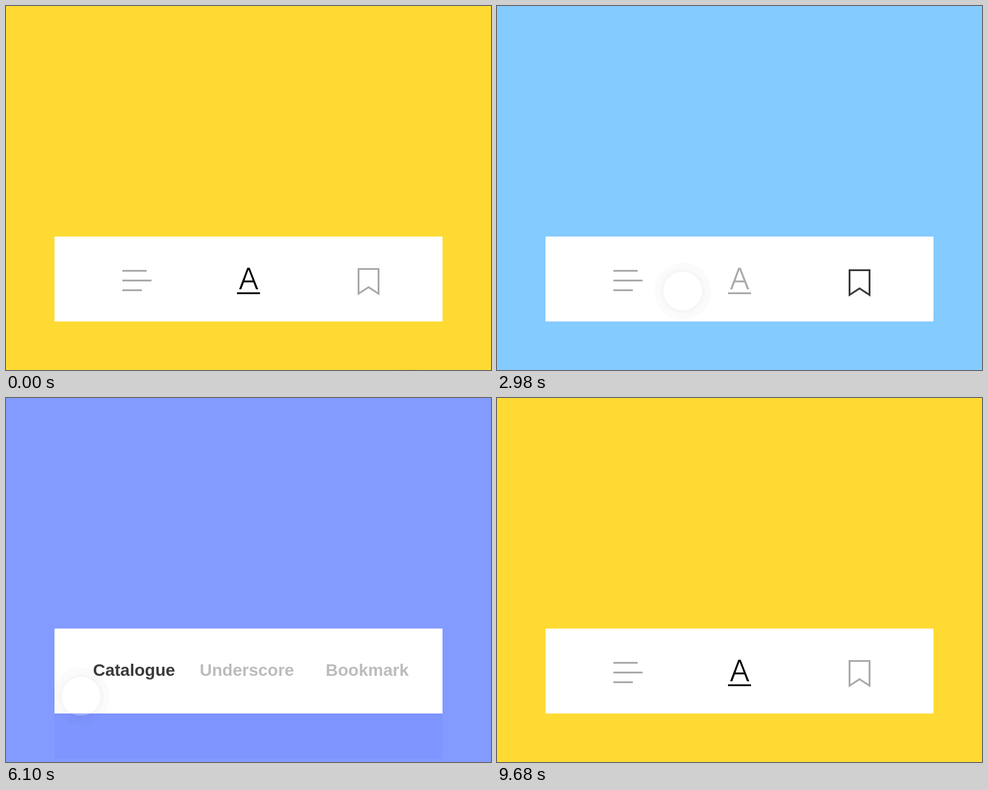
Recreate the animation shown at these times as an HTML page. Size 800 by 600 pixels, loop 9.72 s.

```html
<!DOCTYPE html>
<html lang="en">
<head>
<meta charset="utf-8">
<title>Tab bar</title>
<style>
  html, body { margin: 0; width: 100%; height: 100%; overflow: hidden; }
  #stage { position: relative; width: 800px; height: 600px; overflow: hidden; }
  svg { position: absolute; inset: 0; display: block; }
  text { font: bold 28px "Liberation Sans", Arial, sans-serif; }
  #cursor {
    position: absolute; left: -32px; top: -32px; width: 64px; height: 64px;
    border-radius: 50%; background: rgba(255, 255, 255, .2);
    box-shadow: 0 0 0 15px rgba(0, 0, 0, .015), 0 0 8px 1px rgba(0, 0, 0, .055);
  }
</style>
</head>
<body>
<div id="stage">
  <svg width="800" height="600" viewBox="0 0 800 600">
    <rect id="tint" x="80" y="520" width="640" height="75" fill="#7f95ff"/>
    <rect x="80" y="380" width="640" height="140" fill="#fff"/>
    <g id="catalogue">
      <path class="icon" d="M192 435h40v3h-40z M192 451h48v3h-48z M192 467h32v3h-32z"/>
      <text class="label" x="143.5" y="460">Catalogue</text>
    </g>
    <g id="underscore">
      <path class="icon" fill-rule="evenodd" d="M384.5 467L398 431.5h4L416 467h-3.6l-4.4-11.5h-15.6L388.1 467z
        M393.5 452.5h13.4L400 434.5z M381 472h38v3h-38z"/>
      <text class="label" x="319.5" y="460">Underscore</text>
    </g>
    <g id="bookmark">
      <path class="icon" fill-rule="evenodd" d="M580 432h36v45l-18-11.7-18 11.7z
        M583 435v36.5l15-9.8 15 9.8V435z"/>
      <text class="label" x="527.3" y="460">Bookmark</text>
    </g>
  </svg>
  <div id="cursor"></div>
</div>
<script>
const LOOP = 9720, SHIFT = 25, GREY = 169;
const YELLOW = [255, 218, 51], BLUE = [132, 203, 255], INDIGO = [131, 155, 255];

// start, end, colour, newly selected tab
const taps = [
  [1305, 1640, BLUE, 'bookmark'],
  [3390, 3820, INDIGO, 'catalogue'],
  [7830, 8170, YELLOW, 'underscore']
];

// icon-to-label swaps and back: in start, in end, out start, out end
const allTabs = [5700, 6160, 7150, 7620];
const swaps = {
  catalogue: [[3390, 3820, 4705, 5200], allTabs],
  underscore: [allTabs, [7830, 8170, 9385, 9680]],
  bookmark: [[1305, 1640, 2560, 3040], allTabs]
};

// start, end, from, bend, to
const moves = [
  [480, 1180, [660, 643], [655, 540], [614, 468]],
  [2570, 3230, [614, 468], [380, 484], [243, 462]],
  [5710, 6140, [243, 462], [150, 470], [123.5, 492]],
  [6140, 7460, [123.5, 492], [200, 500], [388, 459]],
  [8360, 9160, [388, 459], [390, 540], [391, 648]]
];

const $ = id => document.getElementById(id);
const clamp = v => Math.min(1, Math.max(0, v));
const span = (t, a, b) => clamp((t - a) / (b - a));
const mix = (a, b, p) => a + (b - a) * p;
const rgb = c => `rgb(${c.map(Math.round).join()})`;
const easeOut = p => 1 - (1 - p) ** 1.7;
const easeInOut = p => p < .5 ? 4 * p ** 3 : 1 - 4 * (1 - p) ** 3;

const tabs = Object.keys(swaps).map(id => ({
  id,
  group: $(id),
  icon: $(id).querySelector('.icon'),
  label: $(id).querySelector('.label')
}));

// The leaving part goes first, then the other one arrives.
function swapState(list, t) {
  let icon = 1, label = 0;
  for (const [a, b, c, d] of list) {
    if (t < a) break;
    const back = t >= c;
    const q = back ? span(t, c, d) : span(t, a, b);
    const gone = 1 - clamp(q / .45), come = clamp((q - .45) / .55);
    icon = back ? come : gone;
    label = back ? gone : come;
    if (t < d) return { icon, label, leaving: q < .45 ? (back ? 'label' : 'icon') : '' };
  }
  return { icon, label, leaving: '' };
}

function place(el, shown, leaving, dir) {
  const off = leaving ? easeOut(1 - shown) : 1 - easeOut(shown);
  el.setAttribute('opacity', shown);
  el.setAttribute('transform', `translate(0 ${dir * SHIFT * off})`);
}

function cursorAt(t) {
  let pos = moves[0][2];
  for (const [a, b, from, bend, to] of moves) {
    if (t < a) break;
    const s = easeInOut(span(t, a, b)), r = 1 - s;
    pos = from.map((v, i) => v * r * r + 2 * r * s * bend[i] + to[i] * s * s);
  }
  return pos;
}

function draw(t) {
  let bg = YELLOW;
  const active = { catalogue: 0, underscore: 1, bookmark: 0 };
  for (const [a, b, colour, id] of taps) {
    const p = span(t, a, b);
    bg = bg.map((v, i) => mix(v, colour[i], p));
    for (const k in active) active[k] = mix(active[k], k === id ? 1 : 0, p);
  }
  $('stage').style.background = rgb(bg);
  $('tint').setAttribute('opacity', span(t, 5700, 6000) * (1 - span(t, 7830, 8000)));

  for (const { id, group, icon, label } of tabs) {
    const state = swapState(swaps[id], t);
    const g = GREY * (1 - active[id]);
    group.setAttribute('fill', rgb([g, g, g]));
    place(icon, state.icon, state.leaving === 'icon', 1);
    place(label, state.label, state.leaving === 'label', -1);
  }

  const [x, y] = cursorAt(t);
  $('cursor').style.transform = `translate(${x}px, ${y}px)`;
}

const start = performance.now();
function tick() {
  draw((performance.now() - start) % LOOP);
  requestAnimationFrame(tick);
}
tick();
</script>
</body>
</html>
```
